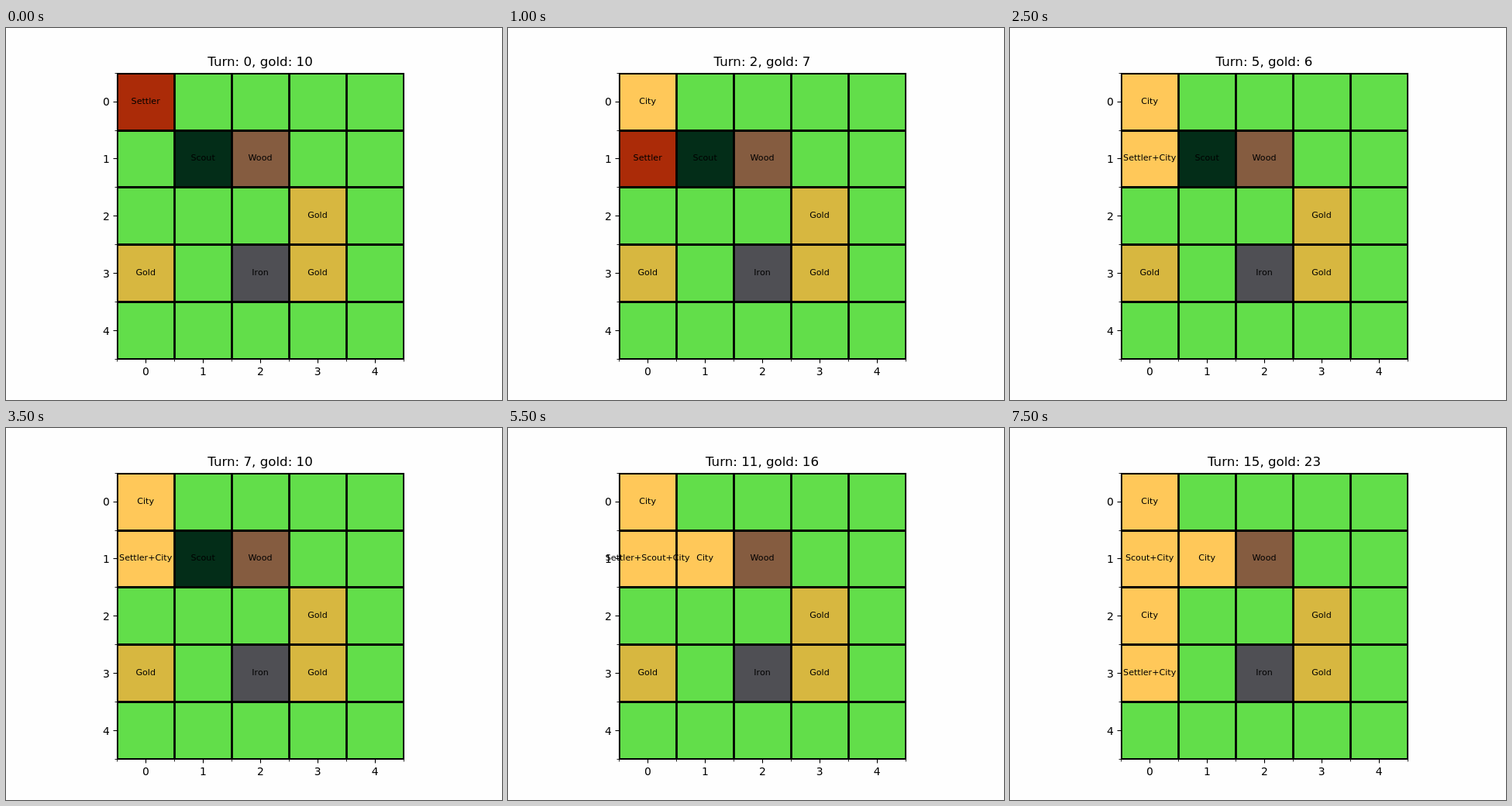
Recreate the animation shown at these times as an HTML page with a canvas. Size 640 by 480 pixels, loop 8 s.

```html
<!DOCTYPE html>
<html>
<head>
<meta charset="utf-8">
<style>
  html, body { margin: 0; overflow: hidden; background: #fefefe; }
  canvas { display: block; }
</style>
</head>
<body>
<canvas id="stage" width="640" height="480"></canvas>
<script>
const ctx = document.getElementById('stage').getContext('2d');
const TURN_MS = 500, TURNS = 16, SIZE = 5;

const COLORS = {
  Land: '#62de4a', Settler: '#ab2b08', Scout: '#032d18', City: '#ffc859',
  Wood: '#855c40', Gold: '#d7b740', Iron: '#4f4f54'
};

// Cells are keyed "row,col".
const RESOURCES = { '1,2': 'Wood', '2,3': 'Gold', '3,0': 'Gold', '3,2': 'Iron', '3,3': 'Gold' };

// [first turn, cell]
const SETTLER = [[0, '0,0'], [2, '1,0'], [8, '1,1'], [10, '1,0'], [12, '2,0'], [14, '3,0']];
const SCOUT = [[0, '1,1'], [11, '1,0']];
const CITIES = [[1, '0,0'], [5, '1,0'], [9, '1,1'], [13, '2,0'], [15, '3,0']];
const TREASURY = [10, 6, 7, 8, 9, 6, 8, 10, 12, 10, 13, 16, 19, 18, 23, 23];

const EDGE_X = [143.5, 217.5, 291.5, 365.5, 439.5, 513.5];
const EDGE_Y = [58.5, 132.5, 205.5, 279.5, 353.5, 427.5];
const LABEL_Y = [98, 171, 245, 319, 393];
const centerX = col => 180.16 + 73.92 * col;
const centerY = row => 94.56 + 73.92 * row;

const placeAt = (path, turn) => path.filter(([start]) => start <= turn).pop()[1];

function text(str, x, y, size, align = 'center') {
  ctx.font = `${size}px "DejaVu Sans", sans-serif`;
  ctx.textAlign = align;
  ctx.fillStyle = '#000';
  ctx.fillText(str, x, y);
}

function line(x1, y1, x2, y2, width) {
  ctx.lineWidth = width;
  ctx.beginPath();
  ctx.moveTo(x1, y1);
  ctx.lineTo(x2, y2);
  ctx.stroke();
}

function contents(cell, turn) {
  const found = [];
  if (placeAt(SETTLER, turn) === cell) found.push('Settler');
  if (placeAt(SCOUT, turn) === cell) found.push('Scout');
  if (CITIES.some(([start, place]) => start <= turn && place === cell)) found.push('City');
  if (!found.length && RESOURCES[cell]) found.push(RESOURCES[cell]);
  return found;
}

function drawAxes() {
  const [left, right] = [EDGE_X[0], EDGE_X[SIZE]];
  const [top, bottom] = [EDGE_Y[0], EDGE_Y[SIZE]];

  ctx.save();
  ctx.beginPath();
  ctx.rect(143, 58, 370, 370);
  ctx.clip();
  EDGE_X.forEach(x => line(x, top, x, bottom, 2.78));
  EDGE_Y.forEach(y => line(left, y, right, y, 2.78));
  ctx.restore();

  ctx.lineWidth = 1.11;
  ctx.strokeRect(left, top, right - left, bottom - top);

  EDGE_X.forEach(x => line(x, bottom, x, bottom + 3, 0.83));
  EDGE_Y.forEach(y => line(left, y, left - 3, y, 0.83));
  for (let i = 0; i < SIZE; i++) {
    const x = Math.round(centerX(i)) + 0.5, y = Math.round(centerY(i)) + 0.5;
    line(x, bottom, x, bottom + 5, 1.11);
    line(left, y, left - 5, y, 1.11);
    text(i, centerX(i) + 0.3, 448, 13.89);
    text(i, 133.8, 100 + 74 * i, 13.89, 'right');
  }
}

function draw(turn) {
  ctx.fillStyle = '#fefefe';
  ctx.fillRect(0, 0, 640, 480);

  const labels = [];
  for (let row = 0; row < SIZE; row++) {
    for (let col = 0; col < SIZE; col++) {
      const found = contents(`${row},${col}`, turn);
      const x = Math.floor(EDGE_X[col]), y = Math.floor(EDGE_Y[row]);
      ctx.fillStyle = COLORS[found[found.length - 1] || 'Land'];
      ctx.fillRect(x, y, Math.floor(EDGE_X[col + 1]) - x, Math.floor(EDGE_Y[row + 1]) - y);
      if (found.length) labels.push([found.join('+'), centerX(col), LABEL_Y[row]]);
    }
  }
  drawAxes();
  labels.forEach(([str, x, y]) => text(str, x, y, 11.11));
  text(`Turn: ${turn}, gold: ${TREASURY[turn]}`, 328, 49, 16.67);
}

const start = performance.now();
function tick() {
  draw(Math.floor((performance.now() - start) / TURN_MS) % TURNS);
  requestAnimationFrame(tick);
}
tick();
</script>
</body>
</html>
```
